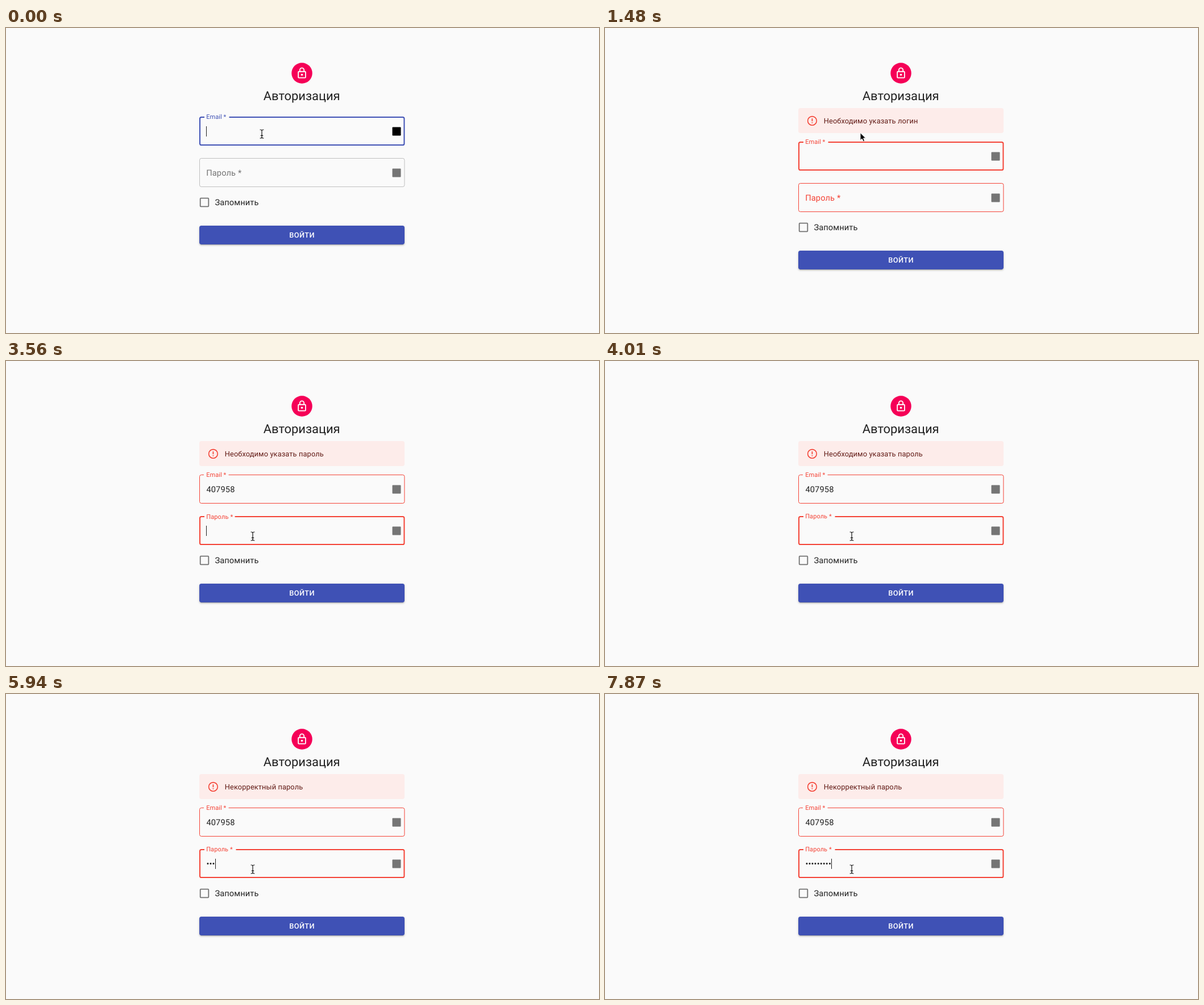
Animation of 1043 by 537 pixels, one loop 8 s. Source, as an HTML page:

```html
<!DOCTYPE html>
<html lang="ru">
<head>
<meta charset="utf-8">
<title>Авторизация</title>
<style>
  html, body { margin: 0; width: 100%; height: 100%; overflow: hidden; background: #fafafa; }
  svg { display: block; width: 1043px; height: 537px; font-family: Roboto, sans-serif; text-rendering: geometricPrecision; }
  .ink { fill: rgba(0, 0, 0, .87); }
  .body { font-size: 14.6px; letter-spacing: .00938em; }
  .title { font-size: 21.9px; }
  .alert { font-size: 12.77px; letter-spacing: .01071em; fill: #611a15; }
  .button { font-size: 12.77px; font-weight: 500; letter-spacing: .02857em; fill: #fff; }
</style>
</head>
<body>
<svg viewBox="0 0 1043 537">
  <rect width="1043" height="537" fill="#fafafa"/>
  <circle cx="520.5" cy="79.5" r="18.25" fill="#f50057"/>
  <g transform="translate(509.55 68.55) scale(.912)" fill="none" stroke="#fff" stroke-width="2">
    <rect x="5" y="9" width="14" height="12" rx="1"/>
    <path d="M8 8.5V6a4 4 0 0 1 8 0v2.5"/>
    <circle cx="12" cy="15" r="2" fill="#fff" stroke="none"/>
  </g>
  <text class="ink title" x="520.2" y="127" text-anchor="middle">Авторизация</text>

  <g id="alert">
    <rect x="340" y="141" width="361" height="44" rx="3.65" fill="#fdecea"/>
    <circle cx="364.4" cy="163.4" r="7.8" fill="none" stroke="#f44336" stroke-width="1.6"/>
    <path d="M364.4 159.2v5M364.4 165.9v1.7" stroke="#f44336" stroke-width="1.7"/>
    <text id="message" class="alert" x="384.8" y="168"></text>
  </g>

  <g id="form">
    <g id="email"></g>
    <g id="password"></g>
    <rect x="341.7" y="299.7" width="14.6" height="14.6" rx="1" fill="none" stroke="rgba(0,0,0,.54)" stroke-width="1.8"/>
    <text class="ink body" x="367.4" y="312">Запомнить</text>
    <rect x="341.8" y="352.5" width="357.4" height="29.2" rx="2" fill="rgba(0,0,0,.2)" style="filter:blur(.45px)"/>
    <rect x="340" y="349.8" width="361" height="33" rx="3.65" fill="rgba(0,0,0,.14)" style="filter:blur(.9px)"/>
    <rect x="340" y="348.9" width="361" height="33" rx="3.65" fill="rgba(0,0,0,.12)" style="filter:blur(2.3px)"/>
    <rect x="340" y="348" width="361" height="33" rx="3.65" fill="#3f51b5"/>
    <text class="button" x="520.6" y="369" text-anchor="middle">ВОЙТИ</text>
  </g>

  <g id="arrow">
    <path d="M0 0V13.2L3 10.4L5.2 15.2L7.6 14.2L5.5 9.5H9.6Z" fill="#000" stroke="#fff" stroke-width="1" stroke-linejoin="round"/>
  </g>
  <g id="beam" fill="none" stroke-linecap="round">
    <path id="beamHalo" stroke="#fff" stroke-width="2.6"/>
    <path id="beamLine" stroke="#111" stroke-width="1.2"/>
  </g>
</svg>
<script>
const LOOP = 8000;
const LOGIN = '407958';
const BLUE = '#3f51b5', RED = '#f44336';
const TEXT_X = 352.45;
const $ = id => document.getElementById(id);

// Value of the last [start, value] pair that has begun, or undefined before the first.
const at = (t, track) => track.reduce((value, [start, next]) => t >= start ? next : value, undefined);
const set = (node, attrs) => Object.entries(attrs).forEach(([key, value]) => node.setAttribute(key, value));
const show = (node, visible) => { node.style.display = visible ? '' : 'none'; };
const lerp = (a, b, p) => a + (b - a) * p;

const beamShape = 'M-3 -7.5Q-.3 -7.5 0 -5.8Q.3 -7.5 3 -7.5M0 -6V6M-3 7.5Q-.3 7.5 0 5.8Q.3 7.5 3 7.5M-1.8 2.8H1.8';
$('beamHalo').setAttribute('d', beamShape);
$('beamLine').setAttribute('d', beamShape);

function makeField(id, top, label, notchWidth, advance) {
  const root = $(id);
  const add = (tag, attrs) => {
    const node = document.createElementNS('http://www.w3.org/2000/svg', tag);
    set(node, attrs);
    return root.appendChild(node);
  };
  root.setAttribute('transform', `translate(0 ${top})`);
  const border = add('rect', { fill: 'none' });
  const notch = add('rect', { y: -1, height: 4, fill: '#fafafa' });
  const caption = add('text', { x: 352.2, 'letter-spacing': '.00938em' });
  caption.textContent = label;
  const selection = add('rect', { x: 352, y: 17, height: 18, fill: '#b3d7ff' });
  const value = add('text', { class: 'ink body', x: TEXT_X, y: 31 });
  const caret = add('rect', { class: 'ink', y: 17, width: 1, height: 18 });
  const badge = add('rect', { x: 679.5, y: 18.5, width: 15, height: 15, rx: 1 });

  return ({ focused, error, raised, text, caretOn, selected }) => {
    const line = focused ? 2 : 1;
    const active = error ? RED : BLUE;
    set(border, {
      x: 340 + line / 2, y: line / 2, width: 361.4 - line, height: 51 - line, rx: 3.6 - line / 2,
      stroke: focused || error ? active : 'rgba(0,0,0,.23)', 'stroke-width': line
    });
    set(notch, { x: focused ? 349 : 348, width: notchWidth * raised });
    set(caption, {
      y: lerp(31, 4, raised), 'font-size': lerp(14.6, 10.95, raised),
      fill: focused || error ? active : 'rgba(0,0,0,.54)'
    });
    value.textContent = text;
    const width = text.length * advance;
    set(selection, { width });
    show(selection, selected);
    set(caret, { x: Math.round(TEXT_X + width) });
    show(caret, caretOn);
    badge.setAttribute('fill', focused && !error ? '#000' : '#757575');
  };
}

const drawEmail = makeField('email', 156, 'Email *', 43.5, 8.35);
const drawPassword = makeField('password', 229, 'Пароль *', 55.5, 5.07);

const emailCaret = [[0, 1], [150, 0], [590, 1], [1190, 0], [1630, 1], [2970, 0]];
const emailLength = [[0, 0], [2080, 2], [2230, 4], [2380, 6]];
const passwordCaret = [[0, 0], [3410, 1], [4010, 0], [4460, 1], [5340, 0], [5940, 1], [6230, 0], [6530, 1], [6980, 0], [7280, 1]];
const passwordLength = [[0, 0], [4600, 1], [4750, 2], [4890, 3], [6530, 0], [7280, 1], [7430, 3], [7570, 5], [7720, 7], [7870, 9]];
const labelRise = [[0, 0], [3410, .16], [3560, .965], [3710, 1]];
const pointerTravel = [[0, 0], [2830, .1], [2970, .4], [3120, .75], [3270, 1]];
const messages = [
  [0, ''],
  [1480, 'Необходимо указать логин'],
  [2680, 'Необходимо указать пароль'],
  [5190, 'Некорректный пароль']
];

function drawPointer(t) {
  const travel = at(t, pointerTravel);
  const x = lerp(450, 434, travel), y = lerp(186, 308, travel);
  const overField = t < 1330 || (y > 200 && y < 251) || y > 273;
  show($('beam'), overField);
  show($('arrow'), !overField);
  set($('beam'), { transform: `translate(${x} ${y + .5})` });
  set($('arrow'), { transform: `translate(${x - 1} ${y - 1.5})` });
}

function render(t) {
  const error = t >= 1480;
  const onPassword = t >= 3410;
  show($('alert'), error);
  $('message').textContent = at(t, messages);
  set($('form'), { transform: `translate(0 ${error ? 44 : 0})` });
  drawEmail({
    focused: !onPassword, error, raised: 1,
    text: LOGIN.slice(0, at(t, emailLength)),
    caretOn: !onPassword && at(t, emailCaret), selected: false
  });
  drawPassword({
    focused: onPassword, error, raised: at(t, labelRise),
    text: '•'.repeat(at(t, passwordLength)),
    caretOn: at(t, passwordCaret), selected: t >= 6230 && t < 6530
  });
  drawPointer(t);
}

const start = performance.now();
function tick() {
  render((performance.now() - start) % LOOP);
  requestAnimationFrame(tick);
}
tick();
</script>
</body>
</html>
```
